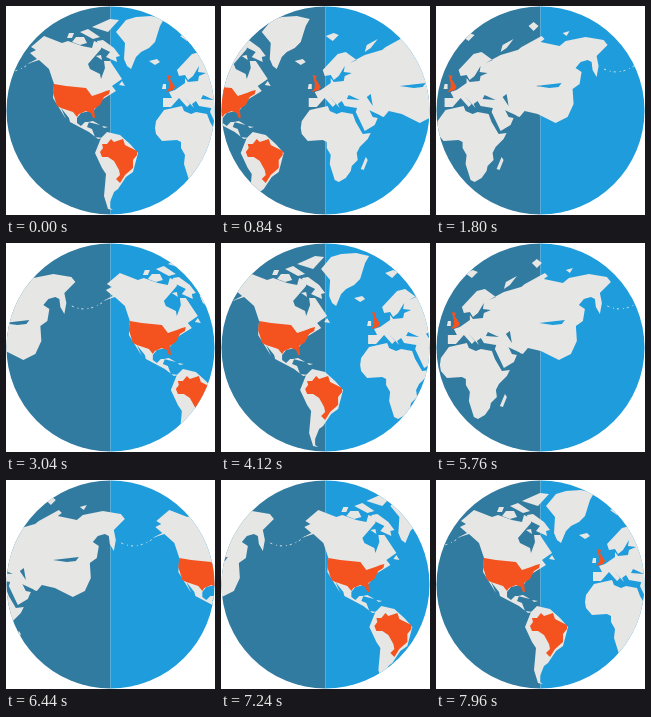
An HTML page for the animation above (8 s loop, 209 by 209 pixels).

```html
<!DOCTYPE html>
<html lang="en">
<head>
<meta charset="utf-8">
<title>Turning globe</title>
<style>
html, body { margin: 0; height: 100%; overflow: hidden; background: #fff; }
svg { display: block; width: 100vw; height: 100vh; }
.land { fill: #e6e6e4; fill-rule: evenodd; }
.marked { fill: #f4531f; }
.chain { fill: none; stroke: #e6e6e4; stroke-dasharray: 2 4 1 3; }
</style>
</head>
<body>
<svg viewBox="0 0 209 209">
  <defs>
    <clipPath id="disc"><circle cx="104.5" cy="104.5" r="104"/></clipPath>
    <g id="world">
      <g class="land">
        <!-- North and Central America -->
        <path d="M21 58L31 53 24 47 30 44 25 41 38 30 56 37 62 35 76 40 86 42 88 35 95 38 95 43 82 58 84 63 94 68 95 73 99 62 98 55 104 55 116 73 106 80 110 85 97 93 88 104 75 107 71 112 71 117 75 120 79 116 83 116 81 121 86 123 89 131 97 132 92 133 83 126 64 116 63 112 55 102 60 113 47 92 48 78 43 63 33 54z"/>
        <!-- Arctic islands -->
        <path d="M86 21L104 13 113 14 102 26zM61 32L63 27 68 27 66 32zM66 36L70 31 78 31 81 37 74 39zM74 26L82 23 94 31 87 33z"/>
        <path d="M91 35L97 34 108 42 114 50 110 51 111 56 100 51 104 46 92 40zM90 50L95 49 96 54z"/>
        <path d="M110 26L120 14 130 11 145 10 158 13 154 20 149 36 143 42 135 46 130 51 125 63 121 60 118 53 119 37z"/>
        <path d="M143 55L151 53 154 56 149 59zM113 79L116 75 119 80zM82 116L87 115 94 119zM96 120L102 121 98 122z"/>
        <!-- South America -->
        <path d="M95 132L101 126 114 129 124 138 132 147 127 166 120 171 112 183 108 186 104 196 104 202 107 204 102 203 98 190 100 168 96 162 89 147z"/>
        <!-- Africa -->
        <path d="M158 104L176 100 178 105 185 108 190 106 201 108 204 116 211 128 219 127 216 133 208 141 205 147 206 154 200 160 199 165 194 172 187 176 183 174 178 158 179 149 175 142 175 136 171 134 156 135 150 128 149 122 150 115z"/>
        <path d="M214 151L216 154 212 164 209 163z"/>
        <!-- Europe and its inland seas -->
        <path d="M157 92L166 92 163 86 169 84 179 77 179 72 182 76 192 75 193 70 200 67 192 66 193 60 187 70 182 74 179 69 173 70 171 64 186 48 194 46 205 54 198 57 213 49 230 44 230 110 217 104 193 100 190 95 186 98 188 102 177 90 184 98 181 101 173 92 165 101 157 101zM195 93L197 89 208 94zM215 91L219 88 221 100z"/>
        <path d="M206 100L217 103 221 111 226 112 223 119 213 125 204 106z"/>
        <!-- Asia -->
        <path d="M229 45L234 41 254 30 257 33 253 36 272 40 278 35 298 31 316 34 320 39 309 50 311 60 309 71 305 64 304 56 300 54 293 56 288 62 294 66 292 78 285 83 286 98 280 111 268 117 250 108 237 105 232 111 229 110zM248 80L274 77 271 81 262 82z"/>
        <path d="M174 30L182 27 187 29 181 35zM213 46L215 39 226 33 219 42zM241 20L246 16 251 20 246 25zM275 27L282 25 279 30zM156 83L157 78 160 78 160 83z"/>
      </g>
      <path class="chain" d="M-10 63Q6 71 24 57"/>
      <g class="marked">
        <path d="M48 78L60 80 80 82 86 90 95 87 100 85 104 84 103 88 98 91 94 99 88 103 89 112 87 112 85 107 80 105 73 108 71 111 67 106 55 102 51 100 47 87z"/>
        <path d="M94 146L97 142 96 138 101 138 105 133 108 136 117 133 119 139 131 145 131 149 127 154 127 162 119 169 114 177 110 173 114 169 113 164 108 155 102 151 96 151z"/>
        <path d="M161 69L165 70 164 73 169 81 167 84 160 86 163 82 163 77z"/>
      </g>
    </g>
  </defs>
  <g clip-path="url(#disc)">
    <path fill="#327ba0" d="M0 0H104.5V209H0z"/>
    <path fill="#1e9cdc" d="M104.5 0H209V209H104.5z"/>
    <g id="strip">
      <use href="#world" x="-326.5"/>
      <use href="#world"/>
      <use href="#world" x="326.5"/>
    </g>
  </g>
</svg>
<script>
const WIDTH = 326.5, STEP = 40, STEPS = 100;
const strip = document.getElementById('strip');
const start = performance.now();

// The last step of each turn lands where the first one begins.
function draw(now) {
  const step = Math.floor(Math.max(0, now - start) / STEP) % STEPS;
  strip.setAttribute('transform', `translate(${-WIDTH * step / (STEPS - 1)})`);
  requestAnimationFrame(draw);
}
draw(start);
</script>
</body>
</html>
```
